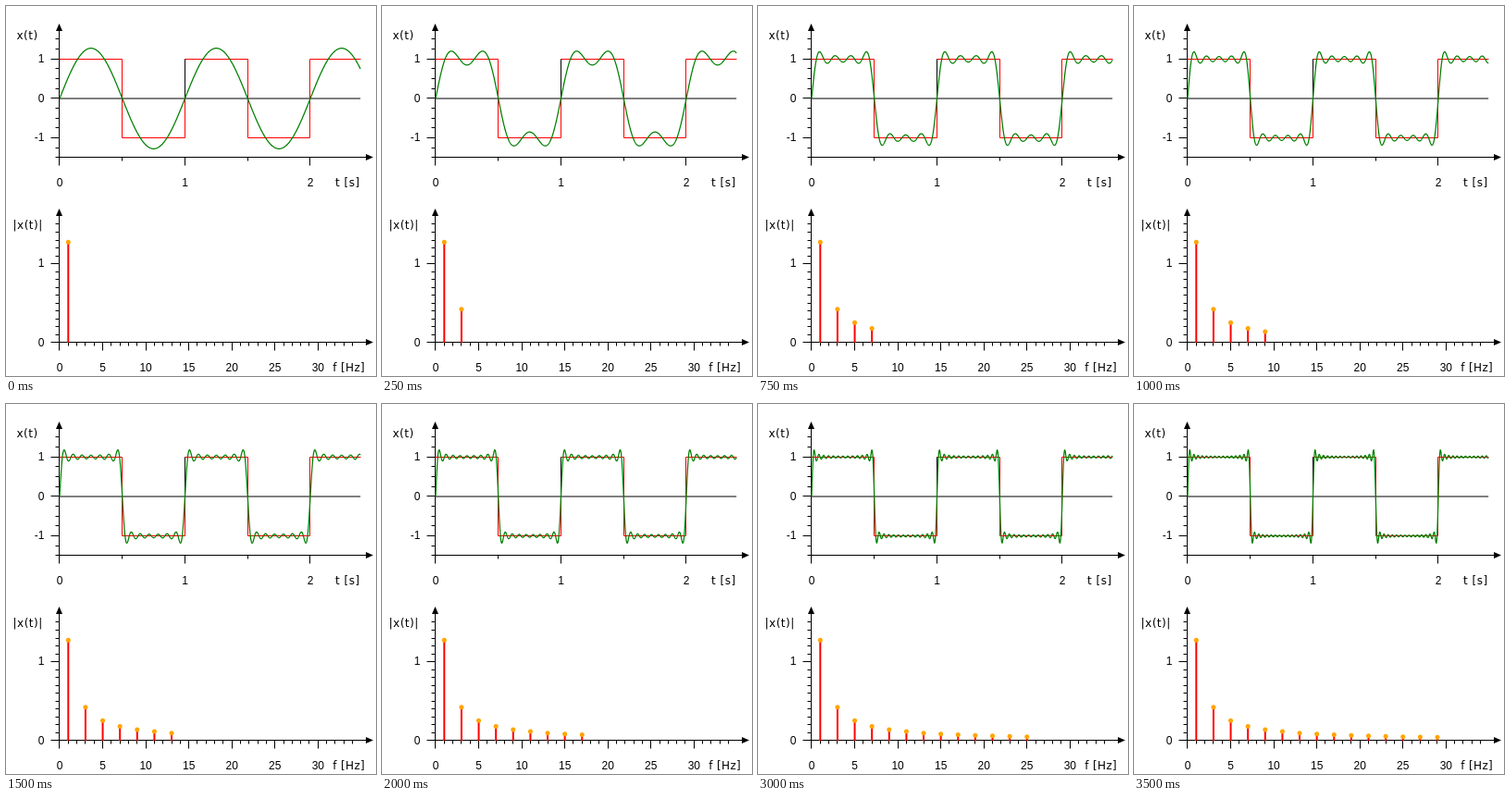
Write an HTML page with a canvas that moves like this. It is 400x400 px and loops after 3.75 s.

```html
<!DOCTYPE html>
<html lang="en">
<head>
<meta charset="utf-8">
<title>Fourier synthesis of a square wave</title>
<style>
  html, body { margin: 0; width: 100%; height: 100%; overflow: hidden; background: #fff; }
  canvas { display: block; }
</style>
</head>
<body>
<canvas id="stage" width="400" height="400"></canvas>
<script>
const ctx = document.getElementById('stage').getContext('2d');
const STEP_MS = 250, STEPS = 15;
const LEFT = 58, SECOND = 135.5, HERTZ = 9.31, END_TIME = 2.4;
const WAVE_ZERO = 100, WAVE_UNIT = 42.67, WAVE_BASE = 164;
const SPEC_ZERO = 364, SPEC_UNIT = 85.33;
const NUMBERS = '12px "Liberation Sans", Arial, sans-serif';
const TITLES = '12px "DejaVu Sans", Verdana, sans-serif';

// Centre of the pixel that a 1px line around v covers; whole numbers fall to the lower pixel.
const crisp = v => Math.ceil(v - 0.01) - 0.5;
const timeX = t => LEFT + t * SECOND;
const freqX = f => LEFT + f * HERTZ;
const waveY = v => WAVE_ZERO - v * WAVE_UNIT;
const specY = v => SPEC_ZERO - v * SPEC_UNIT;
const amplitude = n => 4 / (Math.PI * n);

function stroke(points, color, width = 1) {
  ctx.strokeStyle = color;
  ctx.lineWidth = width;
  ctx.beginPath();
  points.forEach(([x, y]) => ctx.lineTo(x, y));
  ctx.stroke();
}

function line(x1, y1, x2, y2, color = '#000') {
  stroke([[crisp(x1), crisp(y1)], [crisp(x2), crisp(y2)]], color);
}

function triangle(...points) {
  ctx.fillStyle = '#000';
  ctx.beginPath();
  points.forEach(([x, y]) => ctx.lineTo(x, y));
  ctx.fill();
}

function axes(top, base) {
  const x = crisp(LEFT), y = crisp(base);
  line(LEFT, top + 6, LEFT, base + 1);
  line(LEFT, base, 391, base);
  triangle([x, top], [x + 3.5, top + 8], [x - 3.5, top + 8]);
  triangle([397, y], [389, y - 3.5], [389, y + 3.5]);
}

function label(text, x, y, align = 'center', font = NUMBERS, spacing = 0) {
  ctx.font = font;
  ctx.letterSpacing = spacing + 'px';
  ctx.textAlign = align;
  ctx.fillStyle = '#000';
  ctx.fillText(text, x, y);
}

const title = (text, x, y, spacing = 0.5) => label(text, x, y, 'left', TITLES, spacing);
const tickX = (x, base, major) => line(x, base, x, base + (major ? 9 : 4));
const tickY = (y, major) => line(LEFT - (major ? 9 : 4), y, LEFT, y);

function drawWaveAxes() {
  axes(19, WAVE_BASE);
  for (let i = -6; i <= 6; i++) tickY(waveY(i / 4), i % 4 === 0);
  for (let i = 0; i <= 4; i++) tickX(timeX(i / 2), WAVE_BASE, i % 2 === 0);
  stroke([[LEFT, WAVE_ZERO], [timeX(END_TIME), WAVE_ZERO]], '#000');
  for (const v of [1, 0, -1]) label(v, 41.3, Math.floor(waveY(v)) + 4, 'right');
  for (const t of [0, 1, 2]) label(t, timeX(t), 195);
  title('x(t)', 11.5, 36);
  title('t [s]', 356, 195);
}

function drawSpectrumAxes() {
  axes(219, SPEC_ZERO);
  for (let i = 0; i <= 15; i++) tickY(specY(i / 10), i % 10 === 0);
  for (let f = 0; f < 35; f++) tickX(freqX(f), SPEC_ZERO, f % 5 === 0);
  for (const v of [0, 1]) label(v, 41.3, Math.floor(specY(v)) + 4, 'right');
  for (let f = 0; f <= 30; f += 5) label(f, freqX(f), 395);
  title('|x(t)|', 7.5, 241);
  title('f [Hz]', 353.3, 395, 0.35);
}

function drawSquare() {
  for (let i = 0; i < 5; i++) {
    const start = timeX(i / 2), end = timeX(Math.min((i + 1) / 2, END_TIME));
    const y = waveY(i % 2 ? -1 : 1);
    line(start, y, end, y, '#f00');
    if (i) line(start, waveY(1), start, waveY(-1), '#f00');
  }
  line(timeX(1), waveY(1), timeX(1), WAVE_ZERO);
}

function drawSum(harmonics) {
  const points = [];
  for (let t = 0; t <= END_TIME + 1e-6; t += 0.002) {
    const sum = harmonics.reduce((s, n) => s + amplitude(n) * Math.sin(2 * Math.PI * n * t), 0);
    points.push([timeX(t), waveY(sum)]);
  }
  stroke(points, '#008000', 1.25);
}

function drawStem(n) {
  const x = freqX(n), y = specY(amplitude(n));
  stroke([[x, SPEC_ZERO], [x, y]], '#f00', 2);
  ctx.fillStyle = '#ffa500';
  ctx.beginPath();
  ctx.arc(x, y, 2.5, 0, 2 * Math.PI);
  ctx.fill();
}

function draw(step) {
  const harmonics = Array.from({ length: step + 1 }, (_, i) => 2 * i + 1);
  ctx.fillStyle = '#fff';
  ctx.fillRect(0, 0, 400, 400);
  drawWaveAxes();
  drawSquare();
  drawSum(harmonics);
  drawSpectrumAxes();
  harmonics.forEach(drawStem);
}

const startTime = performance.now();
function tick() {
  draw(Math.floor((performance.now() - startTime) / STEP_MS) % STEPS);
  requestAnimationFrame(tick);
}
tick();
</script>
</body>
</html>
```
